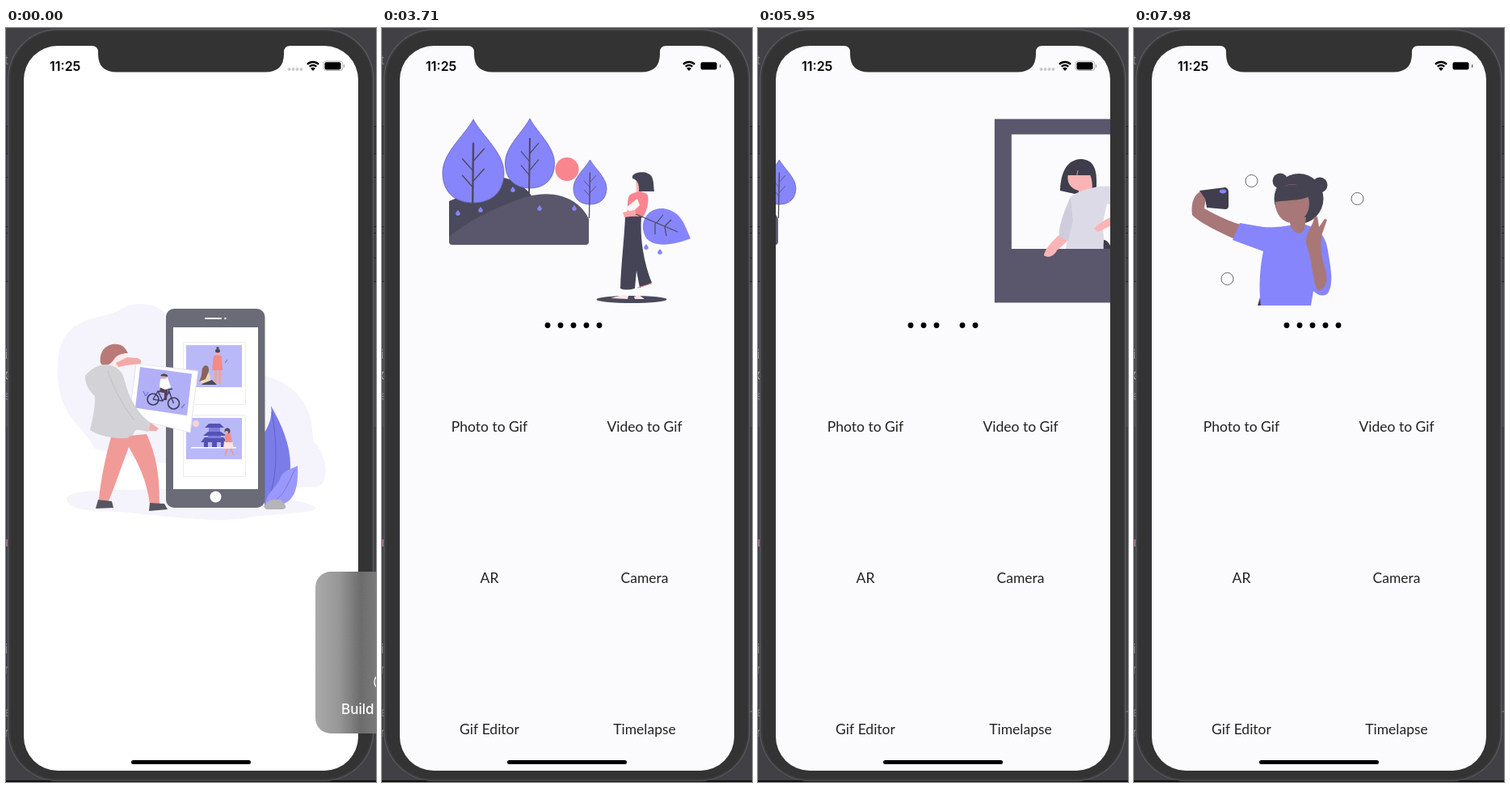
These frames come from a looping animation (458 by 932 pixels, 8000 ms). An HTML page with a canvas:

```html
<!DOCTYPE html>
<html lang="en">
<head>
<meta charset="utf-8">
<title>App carousel</title>
<style>
html, body { margin: 0; width: 100%; height: 100%; overflow: hidden; background: #404045; }
canvas { display: block; width: 458px; height: 932px; }
</style>
</head>
<body>
<canvas id="stage" width="458" height="932"></canvas>
<script>
const c = document.getElementById('stage').getContext('2d');
const LOOP = 8000, PAGE_W = 414;
const VIOLET = '#8685fb', INK = '#4b4a5c', PLUM = '#5a566c', PINK = '#f9858f', PALE = '#f5f3fb';

// Drawing helpers
function path(color, d) { c.fillStyle = color; c.fill(new Path2D(d)); }
function line(color, d, w = 1) { c.strokeStyle = color; c.lineWidth = w; c.stroke(new Path2D(d)); }
function oval(color, x, y, rx, ry = rx) {
  c.fillStyle = color;
  c.beginPath(); c.ellipse(x, y, rx, ry, 0, 0, 7); c.fill();
}
function ring(color, x, y, r, w = 1) {
  c.strokeStyle = color; c.lineWidth = w;
  c.beginPath(); c.arc(x, y, r, 0, 7); c.stroke();
}
function box(color, x, y, w, h, r = 0) {
  c.fillStyle = color;
  c.beginPath(); c.roundRect(x, y, w, h, r); c.fill();
}
function text(s, x, y, font, color, align = 'left') {
  c.font = font; c.fillStyle = color; c.textAlign = align;
  c.fillText(s, x, y);
}
function within(fn) { c.save(); fn(); c.restore(); }

// Timing helpers
const ramp = (t, a, b) => Math.min(1, Math.max(0, (t - a) / (b - a)));
const smooth = u => u * u * (3 - 2 * u);
const easeOut = u => 1 - (1 - u) ** 2.4;

const SWIPES = [[3780, 4130], [5530, 5840], [5850, 6200], [6860, 7190], [7200, 7560]];
const pageAt = t => SWIPES.reduce((sum, [a, b]) => sum + easeOut(ramp(t, a, b)), 0);

const SCROLL = [[4150, 0], [4540, 325], [4620, 305], [4850, 265], [5350, -14], [5460, -5.5], [5640, 0]];
function scrollAt(t) {
  let y = 0;
  for (let i = 1; i < SCROLL.length; i++) {
    const [a, from] = SCROLL[i - 1], [b, to] = SCROLL[i];
    y += (to - from) * smooth(ramp(t, a, b));
  }
  return y;
}

// Illustrations
function leafShape(x, y, w, h) {
  const d = `M${x} ${y}C${x + w * .3} ${y + h * .2} ${x + w} ${y + h * .4} ${x + w} ${y + h * .64}` +
    `C${x + w} ${y + h * .87} ${x + w * .6} ${y + h} ${x} ${y + h}` +
    `C${x - w * .6} ${y + h} ${x - w} ${y + h * .87} ${x - w} ${y + h * .64}` +
    `C${x - w} ${y + h * .4} ${x - w * .3} ${y + h * .2} ${x} ${y}Z`;
  path(VIOLET, d);
  return d;
}
function tree(x, y, w, h, foot) {
  line('#6260b4', leafShape(x, y, w, h), .8);
  line(INK, `M${x} ${y + h * .28}L${x - 1} ${foot}`, w / 16);
  for (const [k, s] of [[.5, 1], [.62, -1], [.74, 1], [.82, -1]])
    line(INK, `M${x} ${y + h * k}l${s * w * .36} ${-h * .15}`, w / 26);
}
function drop(x, y) { leafShape(x, y - 4, 2.8, 7); }

function landscape(pale) {
  if (pale) box(PALE, 120, 140, 136, 120, 5);
  oval(PINK, 229, 174.5, 14.6);
  path(INK, 'M83 214C105 206 122 190 145 184C166 187 181 199 188 212L200 262L83 264Z');
  path(PLUM, 'M83 258C110 235 150 218 178 209C215 198 245 212 256 236V264Q256 268 252 268H87Q83 268 83 264Z');
  tree(113, 113, 38, 103, 237);
  tree(183, 112, 30.5, 86, 208);
  tree(257.5, 163, 20.5, 55, 235);
  for (const [x, y] of [[94, 229], [122, 225], [162, 200], [195, 223], [238, 223]]) drop(x, y);
}

function leafScene(pale) {
  landscape(pale);
  if (pale) path(PALE, 'M322 163C350 165 370 200 370 250C372 310 345 335 318 335C285 335 264 320 264 290C264 260 285 240 292 210C296 180 305 163 322 163Z');
  oval(INK, 309, 335.5, 43.5, 4.5);
  path('#fde6e6', 'M283 334L298 330L305 331L304 335ZM312 332L318 330L325 335L313 335Z');
  path('#fbb8b8', 'M314 187H321V204H315Z');
  path('#454456', 'M310 183C313 177 330 176 334 184C337 191 336 197 337 202H318C319 192 315 187 310 186Z');
  path(PINK, 'M306 207C313 201 326 201 329 207C331 216 327 229 322 235H301C306 227 302 216 306 207Z');
  path('#fff4f4', 'M302 222L316 211L319 219L308 230Z');
  path('#454456', 'M301 233H321C319 260 324 290 334 315L319 321L315 300L313 322Q302 325 295 322C296 290 300 260 301 233Z');
  line('#e88a92', 'M316 321L334 316', 1);
  path('#fba5a8', 'M298 228L313 225L316 232L300 234Z');
  path(VIOLET, 'M325 236C331 222 350 218 365 230C374 238 377 250 382 260C360 269 335 272 326 258C322 249 322 242 325 236Z');
  line(INK, 'M314 230L366 252M340 241L348 231M350 245L358 237M338 241L338 255M350 246L352 257', 1.2);
  drop(327, 271); drop(344, 277);
}

function phoneScene(pale, man = true) {
  if (pale) {
    path(PALE, 'M64 425C64 395 70 375 92 365C118 352 125 360 150 343C190 336 200 352 215 380C260 420 320 425 345 440C370 455 380 480 380 510C400 530 400 565 385 567C340 570 320 565 300 560L110 520C95 490 64 480 64 425Z');
    path(PALE, 'M75 582C80 568 140 572 190 570C280 568 384 585 384 594C380 600 330 600 300 605C260 613 200 603 160 600C130 595 78 602 75 582Z');
  }
  path('#7b7ce8', 'M328 467C341 490 352 515 352 540C352 565 340 580 332 590L320 592V500C326 490 330 480 328 467Z');
  line('#5c5bc8', 'M329 475C338 525 334 560 323 590', .8);
  path('#9a99fb', 'M361 541C362 568 358 588 335 590L321 588C325 570 335 570 340 555C345 545 355 545 361 541Z');
  line('#6665d4', 'M358 545C350 560 345 580 326 588', .7);
  path('#b5b4b9', 'M319 592C322 584 335 580 341 584C347 590 349 595 340 595H322Z');
  box('#6b6a77', 198, 347, 122.5, 246, 10);
  box('#fff', 207, 370, 105, 200);
  box('#fff', 246, 358, 21, 2, 1);
  oval('#fff', 271.5, 359, 1.2);
  oval('#fff', 259.5, 579.5, 7);
  if (pale) line('#ededf2', 'M219.5 388.5H296.5V465.5H219.5ZM219.5 478.5H296.5V554.5H219.5Z');
  box('#bab9f8', 223, 392, 69, 52);
  box('#bab9f8', 223, 482, 69, 51);
  // Two women
  path('#e9a49f', 'M258 420H261V440H258ZM263 420H266V440H263Z');
  path('#f28b88', 'M257 406Q262 402 267 406L268 423H255Z');
  oval('#f0b0a8', 262, 401.5, 2.6, 3); oval(INK, 262, 399, 3, 2.5); oval(INK, 262, 395.5, 1.6);
  path('#e9d9b4', 'M243 428L252 427L254 440H241Z');
  path('#8a6458', 'M243 421C246 414 252 417 251 424L247 434L239 437C243 430 242 425 243 421Z');
  path(INK, 'M242 440L255 435L261 441H243Z');
  line('#7775d8', 'M232 440l-3 -7m3 7l3 -5M271 414l3 -4', 1.2);
  // Pagoda
  oval('#f5d6cf', 235, 489, 4);
  path('#5452b4', 'M246 494L251 489H265L270 494ZM244 504L250 499H266L273 504ZM241 512L246 506H269L275 512ZM245 512H250V519H245ZM255 512H261V519H255ZM266 512H271V519H266Z');
  box('#7f7ddd', 251, 494, 14, 5); box('#7f7ddd', 250, 504, 16, 3);
  box('#fff', 229, 518, 56, 1.4);
  path('#fbe3e3', 'M270 511H280L282 520H269Z');
  path('#f28b88', 'M271 502L278 501L280 512H271Z');
  oval(INK, 274, 498, 3.5); oval('#f0b0a8', 273, 500, 2);
  line('#e99', 'M274 520l-3 9M278 520l4 8', 1.8);
  if (!man) return;
  // Printed picture
  path('#e4e4ea', 'M160.5 414.5L238 423.5L228.5 500.5L152 482Z');
  path('#fff', 'M161.5 415.5L237 424.5L227.5 499.5L153 481Z');
  path('#b1b0f6', 'M166 419L230 427.5L224 479L160 469.5Z');
  line('#7775d8', 'M173 455l-3 -6m3 6l3 -5M217 470l4 -5', 1.4);
  ring('#3f3e62', 182, 459, 7, 1.7); ring('#3f3e62', 207.5, 464, 7, 1.7);
  line('#3f3e62', 'M182 459L188 449L202 450L194 461L182 459M194 461L188 449M207.5 464L201 447L206 446', 1.4);
  path('#5a4050', 'M191 444L200 447L199 460L196 460L196 451L190 450Z');
  path('#fff', 'M191 434L200 432L204 444L197 447L190 444Z');
  oval('#e6a6a0', 196, 431, 2.8); path(INK, 'M191 430Q194 425 200 429L200 431Z');
  // Man
  path('#f19b98', 'M130 506L174 502C187 530 190 555 190 588H178C174 560 165 540 152 518C142 545 135 565 127 585L115 583C117 560 123 530 130 506Z');
  path('#56555f', 'M114 583L131 585L133 593L111 594ZM178 587L196 588L200 595L177 597Z');
  path('#fcebea', 'M133 402H149L147 416L137 421L130 416Z');
  path('#b97977', 'M117 414C115 399 125 389 138 391C146 392 149 398 151 402C143 402 138 404 134 409C130 416 121 421 117 414Z');
  path('#d2d2d7', 'M98 430C104 422 115 415 125 416C138 418 142 424 145 430L151 450C158 468 170 483 182 490L176 499C165 497 160 494 158 502L150 507C132 508 115 504 104 497C108 480 111 465 110 455C102 448 98 440 98 430Z');
  line('#bcbcc4', 'M126 424C133 445 142 462 158 484', .8);
  path('#f3aaa7', 'M136 414L150 407L163 408Q170 411 166 415L149 417L139 419ZM179 488L189 495L186 498L177 498Z');
}

function windowScene(bg) {
  const skin = '#fab4b5', hair = '#3f3d4b', shirt = '#dcdae7';
  box(PLUM, 110, 112.5, 223, 227);
  box(bg, 131, 131.5, 181.5, 141.5);
  line(hair, 'M288 157C301 185 295 210 290 235C286 250 290 262 288 273');
  for (const [x, y, col] of [[283, 150, VIOLET], [302, 172, INK], [289, 187, VIOLET], [305, 199, VIOLET]]) oval(col, x, y, 6);
  path(hair, 'M261 259C275 258 284 265 287 273C275 273 266 268 261 259ZM303 249C301 260 297 268 291 273C289 263 294 255 303 249Z');
  path(hair, 'M236 273C240 257 250 259 255 273Z');
  path(hair, 'M191 201C192 180 198 163 217 162C234 163 237 176 236 198L209 205Z');
  path(skin, 'M201 181H228C232 190 231 198 230 205L214 206V201C203 198 199 190 201 181Z');
  path(hair, 'M200 182C203 168 226 166 229 182Z');
  line(skin, 'M213 176L212 182', .8);
  path(skin, 'M190 256C182 262 172 274 171 281C176 285 184 282 187 275L202 262Z');
  path(shirt, 'M204 209C215 200 240 194 253 196C268 203 281 213 288 224L286 234C278 237 268 236 262 234L272 226L249 217L243 246C247 260 244 266 245 273H198C203 252 203 230 204 209Z');
  path('#cfccdd', 'M204 209C192 235 189 250 190 258L201 263L207 238Z');
  path(skin, 'M268 228C255 232 240 240 233 248L238 252C250 248 258 240 271 236Z');
  oval(INK, 284, 218, 6);
}

function selfieScene() {
  const skin = '#a87777', hair = '#454352';
  for (const [x, y] of [[145.5, 189], [276.5, 211], [115.5, 310]]) ring('#666', x, y, 7.5);
  path(hair, 'M153 343L156 333L192 343Z');
  path(skin, 'M84 201C75 205 70 215 72 231C80 240 105 252 127 262L132 243C115 238 95 228 87 223L89 210Z');
  path('#403e4e', 'M81 201L113 197Q117 198 117 203V220Q117 224 113 224L90 222L88 211Z');
  oval(VIOLET, 110, 202, 4.2, 2.4);
  oval(hair, 181, 189, 9.5); oval(hair, 230, 194, 9.5);
  oval(hair, 204, 211, 30.5, 31);
  path(VIOLET, 'M131 241L160 246C175 247 186 245 193 244L212 243C228 248 237 255 240 275C243 295 248 315 240 328C234 333 227 330 222 325L219 343H157C154 320 156 295 160 276L122 262Z');
  path(skin, 'M192 234H213L211 249Q204 260 194 246Z');
  oval(skin, 196, 217, 21, 24);
  path(hair, 'M174 215C174 190 205 188 223 203C215 214 196 212 174 215Z');
  path(skin, 'M213 266C212 252 222 245 223 234L227 233L229 246L236 236L239 237L233 254C230 265 231 282 237 299C241 313 237 322 228 325C222 318 222 300 217 280Z');
}

const PAGES = [
  (pale) => leafScene(pale),
  () => phoneAt(true),
  () => landscape(false),
  (pale, bg) => windowScene(bg),
  () => phoneAt(false),
  () => selfieScene()
];
function phoneAt(man) {
  within(() => {
    c.translate(22.8, -201.5); c.scale(.9, .9);
    phoneScene(false, man);
  });
}

// Screen parts
const LABELS = ['Photo to Gif', 'Video to Gif', 'AR', 'Camera', 'Gif Editor', 'Timelapse', 'Slowmotion', 'Live Photo to GIF'];

function home(t) {
  const early = t < 3710, bg = early ? '#fff' : '#fbfbfe';
  const page = pageAt(t), scroll = scrollAt(t);
  box(bg, 22, 22, 414, 896);
  PAGES.forEach((draw, i) => {
    const dx = (i - page) * PAGE_W;
    if (Math.abs(dx) < PAGE_W) within(() => { c.translate(dx, 0); draw(early, bg); });
  });
  for (let i = 0; i < 6; i++)
    if (i !== Math.round(page)) oval('#000', 189 + i * 16, 367.5, 3.4);
  within(() => {
    c.beginPath(); c.rect(22, 386, 414, 532); c.clip();
    LABELS.forEach((s, i) => {
      const x = 42 + i % 2 * 192, y = 402 + (i >> 1) * 187 - scroll;
      if (early) box('#f6f4fa', x, y, 181.5, 181.5, 16);
      text(s, x + 91, y + 96.5, '17.5px Lato, sans-serif', '#222', 'center');
    });
  });
}

function splash() {
  box('#fff', 22, 22, 414, 896);
  phoneScene(true);
}

function statusBar(t) {
  const page = Math.round(pageAt(t)), full = t < 1890 || page > 0 && page < 5;
  text('11:25', 54, 52.5, '600 16px Inter, sans-serif', '#000');
  if (full || t < 3710)
    for (let i = 0; i < 4; i++) oval(full ? '#cbcbcd' : '#f1f1f3', 350.5 + i * 5, 51, 2);
  for (const [r, w] of [[10, 2.4], [6, 2.4]]) {
    c.strokeStyle = '#000'; c.lineWidth = w;
    c.beginPath(); c.arc(380, 52, r, -Math.PI * .75, -Math.PI * .25); c.stroke();
  }
  path('#000', 'M380 53L377 49.8Q380 47.5 383 49.8Z');
  if (full) {
    c.strokeStyle = '#b5b5b7'; c.lineWidth = 1;
    c.beginPath(); c.roundRect(393, 41, 24, 11.5, 3.5); c.stroke();
  }
  box('#000', 394.5, 42.2, 20, 9.4, 2);
  box(full ? '#b5b5b7' : '#555', 418, 45, 1.3, 4, 1);
}

function desktop() {
  box('#404045', 0, 0, 458, 932);
  box('#36363a', 0, 122, 458, 34);
  box('#4a4a4f', 0, 313, 458, 180);
  for (const y of [121, 155, 184, 245, 253, 313]) box('#1f1f22', 0, y, 458, 1);
  box('#222', 452, 284, 6, 1);
  const font = '15px Inter, sans-serif';
  for (const [s, y, col] of [['t', 45, '#888'], ['i', 409, '#ddd'], ['C', 435, '#aaa'], ['e', 460, '#888'], ['i', 773, '#ddd'], ['r', 798, '#888'], ['e', 851, '#888'], ['r', 876, '#999']])
    text(s, -2, y, font, col);
  box('#a06a82', 0, 632, 2, 9);
  box('#8a6a5c', 455, 844, 3, 1.5);
  box('#111', 0, 930, 458, 2);
}

function bezel() {
  box('#5a5a5e', 2, 1, 453.5, 930, 62);
  box('#3c3c3e', 3.2, 2.2, 451, 928, 61);
  box('#333334', 5.5, 4, 447, 924, 58);
}

function toast(alpha) {
  within(() => {
    c.globalAlpha = alpha;
    const g = c.createLinearGradient(383, 0, 458, 0);
    g.addColorStop(0, '#aaa');
    g.addColorStop(.4, '#969696');
    g.addColorStop(.75, '#6c6c6c');
    g.addColorStop(1, '#7a7a7a');
    box(g, 383, 672, 200, 200, 19);
    text('Build Succeeded', 415, 848, '500 17px Inter, sans-serif', '#fff');
    line('#fff', 'M459 801C455 805 455 812 459 815', 1.4);
  });
}

function draw(t) {
  desktop();
  bezel();
  within(() => {
    c.beginPath(); c.roundRect(22, 22, 414, 896, 42); c.clip();
    const shown = ramp(t, 1870, 1940);
    if (shown < 1) splash();
    if (shown > 0) { c.globalAlpha = shown; home(t); }
    c.globalAlpha = 1;
    statusBar(t);
    box('#000', 155, 905, 148, 5, 2.5);
  });
  path('#333334', 'M106 20H352V22Q344 22 344 30V32Q344 54.5 321 54.5H137Q114 54.5 114 32V30Q114 22 106 22Z');
  const fade = 1 - ramp(t, 40, 840);
  if (fade > 0) toast(fade);
}

function tick(now) {
  draw(now % LOOP);
  requestAnimationFrame(tick);
}
draw(0);
requestAnimationFrame(tick);
</script>
</body>
</html>
```
